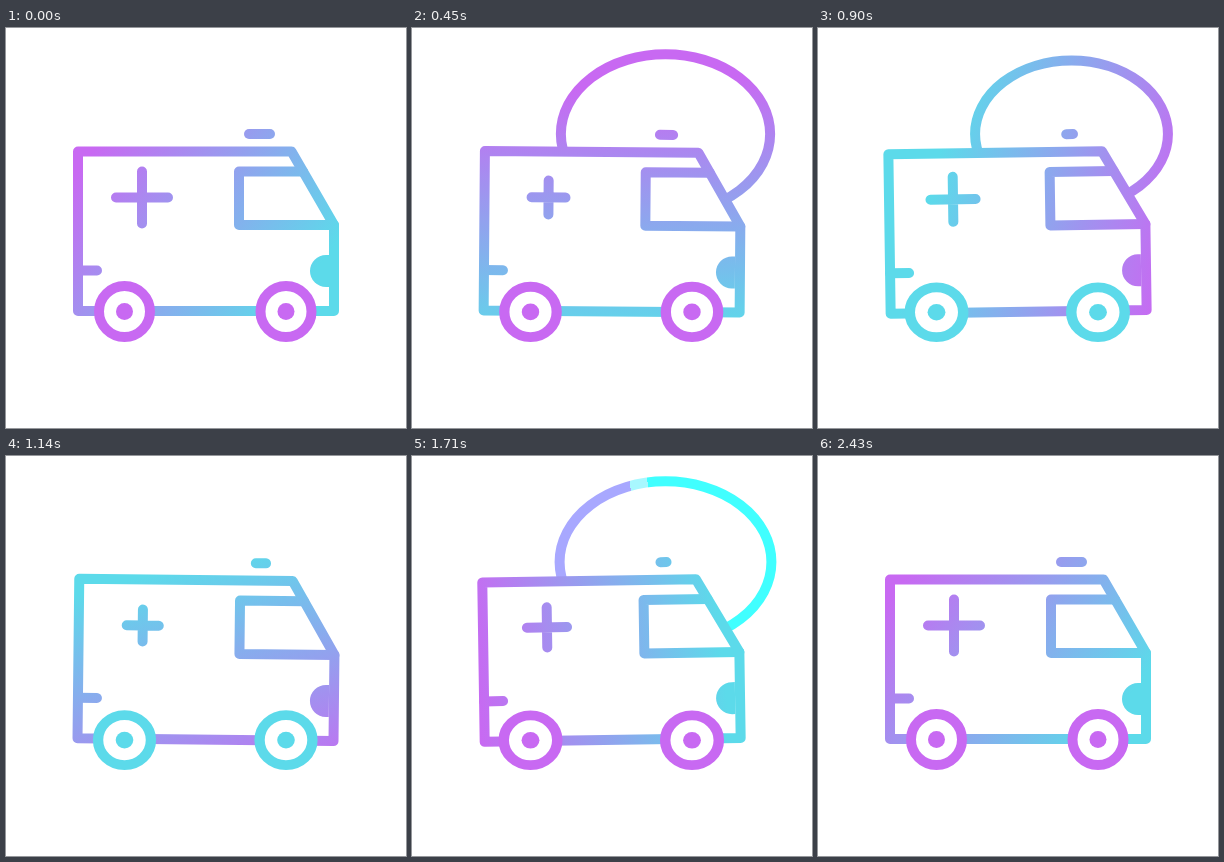
An HTML page that plays this animation: 400 by 400 pixels, repeating every 4460 ms.

```html
<!DOCTYPE html>
<html lang="en">
<head>
<meta charset="utf-8">
<title>Ambulance</title>
<style>
  html, body { margin: 0; width: 100%; height: 100%; overflow: hidden; background: #fff; }
  svg { display: block; width: 100%; height: 100%; }
</style>
</head>
<body>
<svg viewBox="0 0 400 400">
  <defs>
    <linearGradient id="tint" gradientUnits="userSpaceOnUse">
      <stop offset="0" stop-color="#c869f2"/>
      <stop offset="1" stop-color="#5cdaea"/>
    </linearGradient>
    <linearGradient id="glow" gradientUnits="userSpaceOnUse">
      <stop offset=".69" stop-color="#a8a8ff"/>
      <stop offset=".69" stop-color="#a8f8ff"/>
      <stop offset=".76" stop-color="#a8f8ff"/>
      <stop offset=".76" stop-color="#40ffff"/>
    </linearGradient>
  </defs>
  <g fill="none" stroke="url(#tint)" stroke-width="10" stroke-linecap="round" stroke-linejoin="round">
    <ellipse id="ring" cx="253.5" cy="106"/>
    <g id="van">
      <path d="M72 123.5H285.5L328 197V283H72Z" fill="#fff"/>
      <path d="M297 143.5H233V197H328"/>
      <path d="M72 242.5H91"/>
      <path d="M323 227h-3a16 16 0 0 0 0 32h3z" fill="url(#tint)" stroke="none"/>
      <path id="cross"/>
      <path id="siren"/>
    </g>
    <g id="wheels"></g>
  </g>
</svg>
<script>
  const LOOP = 4460, ACTIVE = 2430, STEP = 30;
  const SWAY = 520, PULSE = 750, WAVE = 588;
  const { PI, sin, cos, abs, min, floor } = Math;
  const get = id => document.getElementById(id);
  const set = (el, attrs) => {
    for (const key in attrs) el.setAttribute(key, attrs[key]);
  };
  const wheels = [118.5, 280].map(x => {
    const g = document.createElementNS("http://www.w3.org/2000/svg", "g");
    g.innerHTML = '<circle r="25.5" fill="#fff"/><circle r="8.5" fill="url(#tint)" stroke="none"/>';
    get("wheels").append(g);
    return { g, x };
  });

  // Cubic Bezier easing with control points (x1, 0) and (x2, 1)
  function ease(x, x1, x2) {
    let lo = 0, hi = 1, s;
    for (let i = 0; i < 30; i++) {
      s = (lo + hi) / 2;
      const at = 3 * (1 - s) ** 2 * s * x1 + 3 * (1 - s) * s * s * x2 + s ** 3;
      if (at < x) lo = s; else hi = s;
    }
    return s * s * (3 - 2 * s);
  }

  function turnTint(t) {
    const p = ease(t / ACTIVE, .28, .47);
    const a = (217 + 360 * p) * PI / 180;
    const shift = 12 + 20 * sin(PI * p) ** 2;
    const from = shift + 125, to = shift - 125;
    for (const id of ["tint", "glow"]) set(get(id), {
      x1: 200 + cos(a) * from, y1: 200 + sin(a) * from,
      x2: 200 + cos(a) * to, y2: 200 + sin(a) * to
    });
  }

  function drawRing(t) {
    const u = t % WAVE / WAVE;
    const on = t < 4 * WAVE && u > 0 && u < .92;
    const start = .25 * min(1, u / .05);
    const r = 106 * (start + .75 * (1 - (1 - u) ** 2.8));
    set(get("ring"), {
      rx: r, ry: r * .762,
      stroke: u > .85 ? "url(#glow)" : "url(#tint)",
      visibility: on ? "visible" : "hidden"
    });
  }

  function draw(t) {
    turnTint(t);
    drawRing(t);

    const sway = t < 4 * SWAY ? sin(PI * t / SWAY) : 0;
    const size = abs(sway);
    set(get("van"), { transform: `translate(0 ${1.2 * size}) rotate(${1.1 * sway} 200 238)` });

    const half = 10.5 - 9.5 * size;
    set(get("siren"), { d: `M${253.5 - half} 106h${2 * half}` });

    const arm = 26 - (t < 3 * PULSE ? 10 * sin(PI * t / PULSE) ** 2 : 0);
    set(get("cross"), { d: `M${136 - arm} 169.5h${2 * arm}M136 ${169.5 - arm}v${2 * arm}` });

    for (const { g, x } of wheels) set(g, {
      transform: `translate(${x} ${283.5 + size}) scale(${1 + .065 * size} ${1 - .033 * size})`
    });
  }

  const begin = performance.now();
  function tick() {
    const t = (performance.now() - begin) % LOOP;
    draw(min(ACTIVE, floor(t / STEP) * STEP));
    requestAnimationFrame(tick);
  }
  tick();
</script>
</body>
</html>
```
